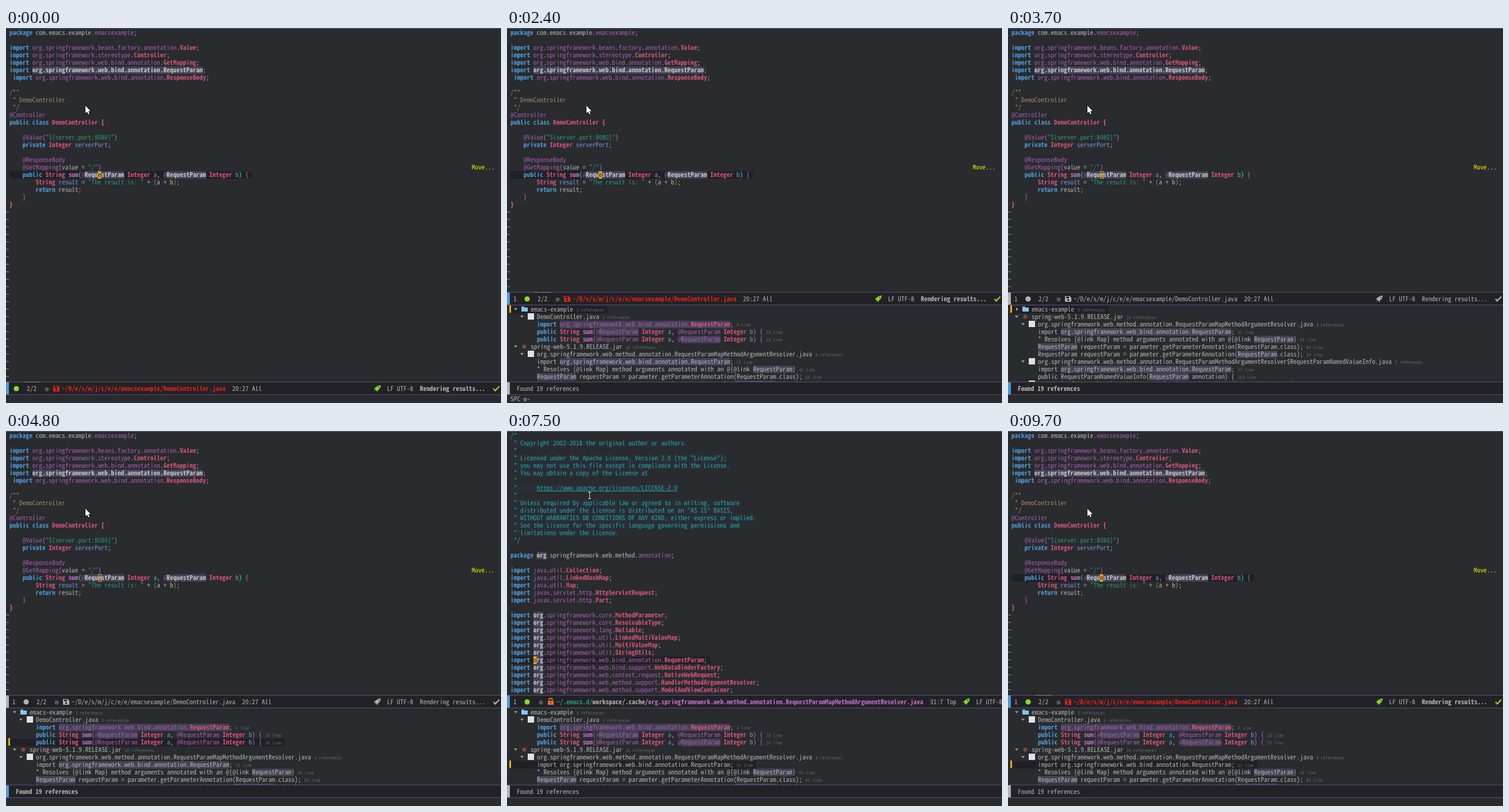
These frames come from a looping animation (860 by 652 pixels, 9.9 s). An HTML page with a canvas:

```html
<!DOCTYPE html>
<html lang="en">
<head>
<meta charset="utf-8">
<title>Editor references</title>
<style>
html, body { margin: 0; width: 100%; height: 100%; overflow: hidden; background: #292b2e; }
canvas { display: block; }
</style>
</head>
<body>
<canvas id="stage" width="860" height="652"></canvas>
<script>
const ctx = document.getElementById('stage').getContext('2d');
const LOOP = 9900, CELL = 5.69, ROW = 13;
const BG = '#292b2e', GREY = '#b2b2b2', GREEN = '#86dc2f', RED = '#e0211d', AMBER = '#eead0e', MARK = '#444155';
const FAMILY = '"Noto Sans Mono CJK JP", "Noto Sans Mono CJK SC", "Noto Sans Mono", monospace';

// One letter per style: colour, weight, background, scale
const STYLES = {
  '-': [GREY], b: [GREY, 'bold'], i: [GREY, 'italic bold'], n: ['#666669', '', '', 0.7],
  k: ['#4f97d7', 'bold'], t: ['#ce537a', 'bold'], f: ['#bc6ec5', 'bold'], q: ['#bc6ec5'],
  p: ['#a45bad'], v: ['#7590db'], s: ['#2d9574'], S: ['#2d9574', 'bold'], d: ['#9f8766'],
  c: ['#2aa1ae', '', '#292e34'], l: ['#2aa1ae', '', '#292e34'],
  g: ['#00cd66', 'bold'], r: ['#ff6a6a', 'bold'], m: ['#67b11d'], G: [GREEN],
  R: [RED, 'bold'], y: ['#f0f000'],
  h: ['#c4c4c4', 'bold', MARK], H: [GREY, '', MARK], P: ['#a45bad', '', MARK], T: ['#ce537a', 'bold', MARK]
};

ctx.textRendering = 'geometricPrecision';
ctx.font = `100px ${FAMILY}`;
const SIZE = CELL / ctx.measureText('0').width * 100;

function box(x, y, w, h, color) {
  ctx.fillStyle = color;
  ctx.fillRect(x, y, w, h);
}

function disc(x, y, r, color) {
  ctx.fillStyle = color;
  ctx.beginPath();
  ctx.arc(x, y, r, 0, 7);
  ctx.fill();
}

function shape(points, color, stroke) {
  ctx.beginPath();
  points.forEach(p => ctx.lineTo(...p));
  if (stroke) {
    ctx.strokeStyle = color;
    ctx.lineWidth = stroke;
    ctx.stroke();
  } else {
    ctx.fillStyle = color;
    ctx.fill();
  }
}

const pieces = s => ('§-' + s).split('§').slice(1);
const width = s => pieces(s).reduce((w, p) => w + (p.length - 1) * CELL * (STYLES[p[0]][3] || 1), 0);

// Writes styled text on the character grid; y is the middle of the row
function put(s, x, y, { flat, bare } = {}) {
  for (const piece of pieces(s)) {
    const [color, weight = '', back, scale = 1] = STYLES[flat ? '-' : piece[0]];
    const chars = piece.slice(1), step = CELL * scale;
    if (back && !bare) box(x, y - 6, chars.length * step, ROW, back);
    ctx.font = `${weight} ${SIZE * scale}px ${FAMILY}`;
    ctx.fillStyle = color;
    [...chars].forEach((ch, i) => ctx.fillText(ch, x + i * step, y + 4));
    if (piece[0] === 'l') box(x, y + 5, chars.length * step, 1, color);
    x += chars.length * step;
  }
}

const dotted = path => '§p' + path.replace(/\./g, '§-.§p');
const use = (path, name) => `§kimport ${dotted(path + '.')}§t${name}§-;`;
const spring = (path, name) => use('org.springframework.' + path, name);
const PARAM = 'org.springframework.web.bind.annotation.RequestParam';

const controller = [
  '§kpackage§- com.emacs.example.§pemacsexample§-;', '',
  spring('beans.factory.annotation', 'Value'),
  spring('stereotype', 'Controller'),
  spring('web.bind.annotation', 'GetMapping'),
  `§kimport §h${PARAM}§-;`,
  ' ' + spring('web.bind.annotation', 'ResponseBody'), '',
  '§d/**', '§d * DemoController', '§d */',
  '§p@Controller',
  '§kpublic class §tDemoController §r{', '',
  '    §p@Value§q(§s"${server.port:8080}"§q)',
  '    §kprivate §tInteger §vserverPort§-;', '',
  '    §p@ResponseBody',
  '    §p@GetMapping§q(§-value = §s"/"§q)',
  '    §kpublic §tString §fsum§g(§p@§hRequestParam§- §tInteger §va§-, §p@§hRequestParam§- §tInteger §vb§g) §q{',
  '        §tString §vresult§- = §s"The result is: "§- + §m(§-a + b§m)§-;',
  '        §kreturn§- result;',
  '    §q}', '§r}'
];

const resolver = [
  '/*',
  ' * Copyright 2002-2018 the original author or authors.',
  ' *',
  ' * Licensed under the Apache License, Version 2.0 (the "License");',
  ' * you may not use this file except in compliance with the License.',
  ' * You may obtain a copy of the License at',
  ' *',
  ' *      §lhttps://www.apache.org/licenses/LICENSE-2.0',
  ' *',
  ' * Unless required by applicable law or agreed to in writing, software',
  ' * distributed under the License is distributed on an "AS IS" BASIS,',
  ' * WITHOUT WARRANTIES OR CONDITIONS OF ANY KIND, either express or implied.',
  ' * See the License for the specific language governing permissions and',
  ' * limitations under the License.',
  ' */'
].map(s => '§c' + s).concat([
  '', '§kpackage §-org.springframework.web.method.§pannotation§-;', '',
  use('java.util', 'Collection'), use('java.util', 'LinkedHashMap'), use('java.util', 'Map'),
  use('javax.servlet.http', 'HttpServletRequest'), use('javax.servlet.http', 'Part'), '',
  spring('core', 'MethodParameter'), spring('core', 'ResolvableType'), spring('lang', 'Nullable'),
  spring('util', 'LinkedMultiValueMap'), spring('util', 'MultiValueMap'), spring('util', 'StringUtils'),
  spring('web.bind.annotation', 'RequestParam'),
  spring('web.bind.support', 'WebDataBinderFactory'),
  spring('web.context.request', 'NativeWebRequest'),
  spring('web.method.support', 'HandlerMethodArgumentResolver'),
  spring('web.method.support', 'ModelAndViewContainer')
]);
const markOrg = s => s.replace(/§[p-]org(?=[.§])/, '§horg§-');

// Reference tree
const node = (icon, name, count) => ({ icon, s: `${name} §n${count} references` });
const leaf = (s, line) => ({ s: `${s} §n${line} line` });
const sumRow = (a, b) => leaf(`§kpublic §tString §fsum§q(§p@§${a}RequestParam§- §tInteger §va§-, §p@§${b}RequestParam§- §tInteger §vb§q) {`, 20);
const getParam = (a, b) => leaf(`§${a}RequestParam§- requestParam = parameter.getParameterAnnotation(§${b}RequestParam§-.class);`, 64);
const METHOD = 'org.springframework.web.method.annotation.RequestParam';

const project = node('folder', 'emacs-example', 3);
const projectRows = [
  node('file', 'DemoController.java', 3),
  leaf(`§kimport §P${PARAM.slice(0, -12)}§TRequestParam§-;`, 6),
  sumRow('P', 'p'), sumRow('p', 'P')
];
const jar = node('jar', 'spring-web-5.1.9.RELEASE.jar', 16);
const jarRows = [
  node('file', METHOD + 'MapMethodArgumentResolver.java', 4),
  leaf(`import §H${PARAM}§-;`, 31),
  leaf('* Resolves {@link Map} method arguments annotated with an @{@link §HRequestParam§-}', 41),
  getParam('H', '-'), getParam('-', 'H'),
  node('file', METHOD + 'MethodArgumentResolver$RequestParamNamedValueInfo.java', 2),
  leaf(`import §H${PARAM}§-;`, 37),
  leaf('public RequestParamNamedValueInfo(§HRequestParam§- annotation) {', 263),
  node('file', METHOD + 'MethodArgumentResolver.java', 7)
];

function arrow(x, y, open) {
  shape(open ? [[x - 3, y - 2], [x + 3, y - 2], [x, y + 2]] : [[x - 1, y - 3], [x - 1, y + 3], [x + 3, y]], '#9a9a9a');
}

const ICONS = {
  folder(x, y) {
    box(x - 5, y - 5, 5, 3, '#5fa8dc');
    box(x - 5, y - 3, 11, 7, '#8cc4ee');
  },
  file: (x, y) => box(x - 5, y - 6, 11, 11, '#dce3ea'),
  jar: (x, y) => disc(x, y, 3.5, '#7d4a3c')
};

function drawTree(t, selected) {
  const early = t < 1300, folded = early || (t >= 3700 && t < 4000);
  const rows = [project, ...(folded ? [] : projectRows), jar, ...(early ? [] : jarRows)];
  ctx.save();
  ctx.beginPath();
  ctx.rect(0, 482, 860, 133);
  ctx.clip();
  rows.slice(0, 11).forEach(({ icon, s }, i) => {
    const y = 489 + i * ROW, on = i === selected;
    const indent = icon === 'folder' || icon === 'jar' ? 0 : 11;
    if (on) {
      box(6, y - 6, 41 + indent + width(s), ROW, '#212026');
      box(4, y - 7, 3, ROW, AMBER);
    }
    if (icon) {
      arrow(15 + indent, y, !(early || (folded && icon === 'folder')));
      ICONS[icon](30 + indent, y);
    }
    put(s, 41 + indent, y, { bare: on });
  });
  ctx.restore();
}

function bar(y, active) {
  box(0, y, 860, 23, '#222226');
  box(0, y, 860, 1, '#5d4d7a');
  box(0, y + 22, 860, 1, '#5d4d7a');
  box(0, y + 1, 5, 21, active ? '#4f97d7' : GREY);
}

function floppy(x, y, color) {
  shape([[x - 5, y - 5], [x + 3, y - 5], [x + 6, y - 2], [x + 6, y + 5], [x - 5, y + 5]], color);
  box(x - 3, y - 4, 5, 3, '#222226');
  disc(x + 0.5, y + 2, 1.7, '#222226');
}

function lock(x, y, color) {
  box(x - 5, y - 1, 10, 7, color);
  ctx.strokeStyle = color;
  ctx.lineWidth = 2;
  ctx.beginPath();
  ctx.arc(x, y - 2, 3, Math.PI, 0);
  ctx.stroke();
  box(x - 0.5, y + 1, 1, 3, '#222226');
}

function rocket(x, y, color) {
  shape([[6, -6], [5, -1], [1, 3], [0, 6], [-2, 2], [-5, 5], [-3, 1], [-6, 0], [-3, -2], [1, -5]]
    .map(([a, b]) => [x + a, y + b]), color);
  disc(x + 2.5, y - 2.5, 1, '#222226');
}

function fileBar(y, active, split, library) {
  const mid = y + 12, dx = split ? 17 : 0, flat = !active;
  const tint = color => active ? color : GREY;
  const say = (s, x) => put(s, x, mid, { flat });
  bar(y, active);
  if (split) say('1', 11);
  disc(18 + dx, mid, 4.6, tint(GREEN));
  if (library) {
    disc(59, mid + 1, 3.5, '#5c565f');
    lock(76, mid - 1, '#dc752f');
    say(`§S~/.emacs.d/§bworkspace/.cache/§f${METHOD}MapMethodArgumentResolver.java`, 86);
    say('31:7 Top', 735);
    rocket(798, mid, GREEN);
    say('LF UTF-8', 815);
    return;
  }
  if (active) box(30 + dx, y, 29, 1, '#8c8c8c');
  say('2/2', 36 + dx);
  disc(71 + dx, mid + 1, 3.5, '#5c565f');
  floppy(87 + dx, mid, tint(RED));
  say('§R~/D/e/s/m/j/c/e/e/emacsexample/DemoController.java', 97 + dx);
  say('20:27 All', 393 + dx);
  rocket(645, mid, tint(GREEN));
  say('LF UTF-8', 662);
  say('§bRendering results...', 719);
  shape([[847, mid], [850, mid + 3.5], [857, mid - 4]], tint(GREEN), 2.2);
}

function drawEditor(t, bottom, active, library) {
  const [row, col, letter] = library ? [30, 7, 'o'] : [19, 27, 'e'];
  const lines = library ? (t >= 7500 ? resolver.map(markOrg) : resolver) : controller;
  const y = 8 + row * ROW, x = 6 + col * CELL;
  ctx.save();
  ctx.beginPath();
  ctx.rect(0, 0, 860, bottom);
  ctx.clip();
  if (active) box(6, y - 6, width(lines[row]) + CELL, ROW, '#212026');
  lines.forEach((s, i) => put(s, 6, 8 + i * ROW));
  if (active) {
    box(x, y - 6, CELL, ROW, AMBER);
    ctx.fillStyle = BG;
    ctx.font = `${SIZE}px ${FAMILY}`;
    ctx.fillText(letter, x, y + 4);
  } else {
    ctx.strokeStyle = AMBER;
    ctx.lineWidth = 1;
    ctx.strokeRect(160.5, y - 5.5, 5, 12);
  }
  if (!library) {
    put('§yMove...', 809, 242);
    for (let ty = 320; ty < bottom - 5; ty += ROW) put('~', 0, ty);
  }
  ctx.restore();
}

function pointer(x, y) {
  const points = [[0, 0], [0, 13], [3, 10.5], [5, 15], [7, 14], [5, 9.8], [9, 9.5], [0, 0]]
    .map(([a, b]) => [x + a, y + b]);
  shape(points, '#111', 2);
  shape(points, '#fff');
}

function beam(x, y) {
  box(x - 1, y - 5, 3, 11, '#1b1c1e');
  box(x, y - 5, 1, 11, '#eee');
  for (const dy of [-6, 5]) box(x - 2, y + dy, 5, 1, '#eee');
}

// Value of the last [start, value] step reached
const at = (t, steps) => steps.reduce((v, [start, next]) => t >= start ? next : v, steps[0][1]);

const MOVES = [4300, 4500, 4600, 4800, 5100, 5300, 5600];
const ECHO = [[0, ''], [2300, 'SPC-'], [2400, 'SPC w-'], [3200, ''],
  [5800, '§GLSP§- :: Connected to [§ijdtls:30520§-].'], [7500, '']];
const MOUSE = [[0, [138, 135]], [5800, [139, 137]], [7500, [143, 112]], [7800, [160, 78]],
  [8000, [165, 155]], [8800, [138, 135]], [9200, [148, 105]], [9700, [138, 135]]];

function draw(t) {
  const split = t >= 900, inTree = t >= 3200 && t < 5800, library = t >= 5800 && t < 8800;
  const bottom = split ? 459 : 615;
  box(0, 0, 860, 652, BG);
  drawEditor(t, bottom, !inTree, library);
  box(0, 0, 860, 1, '#44628f');
  fileBar(bottom, !inTree, split, library);
  if (split) {
    drawTree(t, MOVES.filter(m => t >= m).length);
    bar(615, inTree);
    put('§bFound 19 references', 17, 627, { flat: !inTree });
  }
  put(at(t, ECHO), 6, 645);
  (library ? beam : pointer)(...at(t, MOUSE));
}

let last = -1;
function tick() {
  const step = Math.floor(performance.now() % LOOP / 100);
  if (step !== last) draw((last = step) * 100);
  requestAnimationFrame(tick);
}
tick();
</script>
</body>
</html>
```
